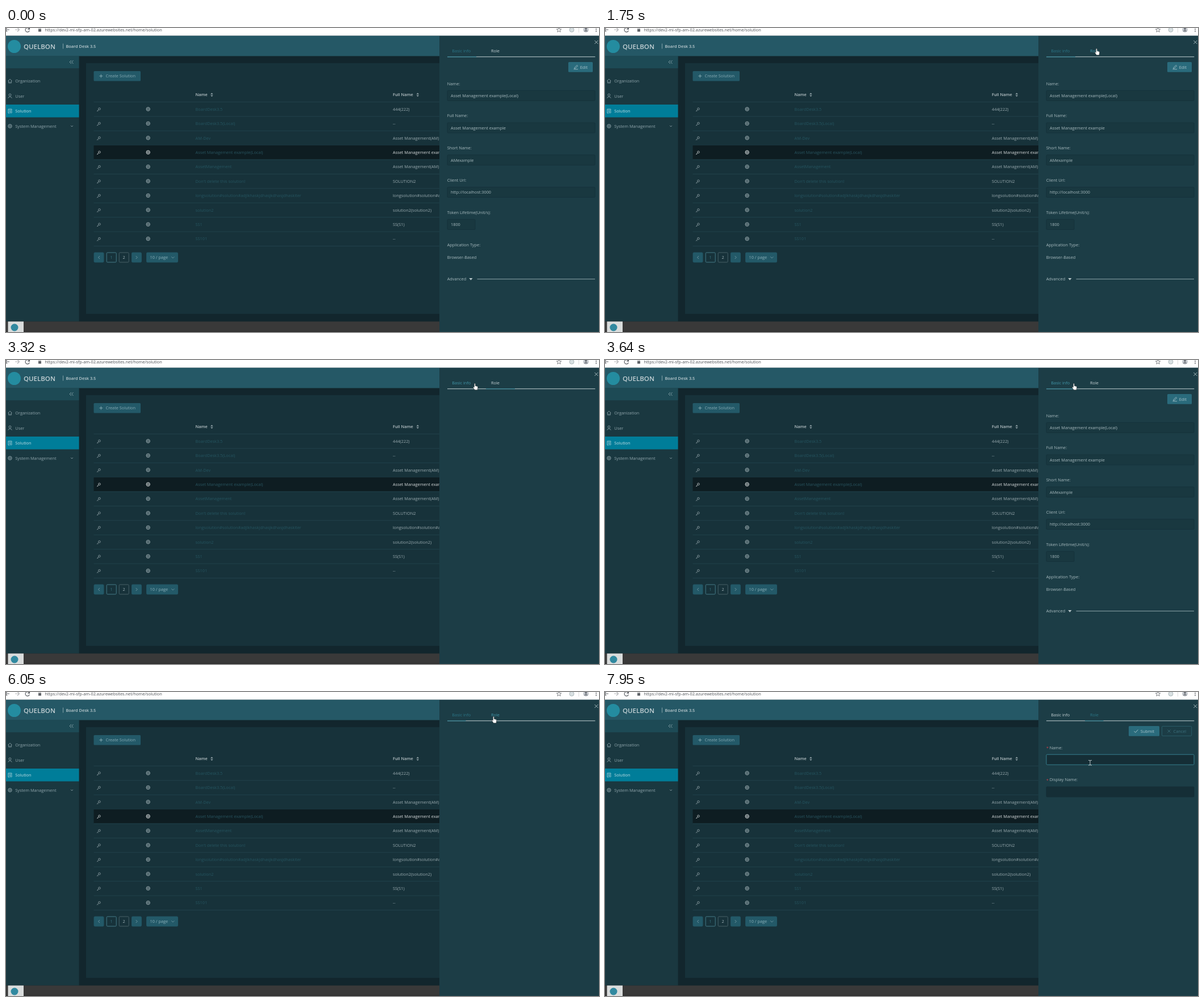
Recreate the animation shown at these times as an HTML page. Size 1044 by 536 pixels, loop 8 s.

```html
<!DOCTYPE html>
<html lang="en">
<head>
<meta charset="utf-8">
<title>Solution settings</title>
<style>
  html, body { margin: 0; width: 100%; height: 100%; overflow: hidden; background: #12272e; }
  svg { display: block; width: 1044px; height: 536px; }
  text { font-family: "Open Sans", "Noto Sans", sans-serif; font-size: 7.35px; white-space: pre; }
</style>
</head>
<body>
<svg id="stage" viewBox="0 0 1044 536" xmlns="http://www.w3.org/2000/svg"></svg>
<script>
const LOOP = 8000;
const TEAL = '#2b7586', HOVER = '#4095a8', LIGHT = '#c3d0d3', LABEL = '#a7babe';
const BUTTON = '#2a6b7c', BUTTON_TEXT = '#a9c4cb', DIM_BUTTON = '#235968';

// Drawing helpers; text is placed by the middle of its line
const rect = (x, y, w, h, fill, more = '') =>
  `<rect x="${x}" y="${y}" width="${w}" height="${h}" fill="${fill}" ${more}/>`;
const text = (x, y, s, fill, more = '') =>
  `<text x="${x}" y="${y + 2.7}" fill="${fill}" ${more}>${s}</text>`;
const line = (d, color, w = 0.8, more = '') =>
  `<path d="${d}" fill="none" stroke="${color}" stroke-width="${w}" ${more}/>`;
const circle = (x, y, r, fill, more = '') =>
  `<circle cx="${x}" cy="${y}" r="${r}" fill="${fill}" ${more}/>`;
const ring = (x, y, r, color, w = 0.8) =>
  circle(x, y, r, 'none', `stroke="${color}" stroke-width="${w}"`);
const group = (id, body, more = '') => `<g id="${id}" ${more}>${body}</g>`;
const BOLD = 'font-weight="600"', MIDDLE = 'text-anchor="middle"';

function plus(x, y, color) {
  return line(`M${x - 3} ${y}h6M${x} ${y - 3}v6`, color, 0.9);
}

function browserBar() {
  const ink = '#5f6368';
  return rect(0, 0, 1044, 13.5, '#fff') +
    line('M-1 3H6M2-.5L-1 3l3 3.5', ink, 1.2) +
    line('M16 3h7M20-.5L23.5 3 20 6.5', '#b5b7ba', 1.2) +
    line('M41 1.5A3.7 3.7 0 1 0 41.3 4.5M41.5-1v3.2h-3.2', ink, 1.2) +
    rect(57, 2, 5, 4.5, ink) + line('M58.2 2V.5a1.3 1.3 0 0 1 2.6 0V2', ink, 0.8) +
    text(68.5, 3.2, 'https://dev2-mi-sfp-am-02.azurewebsites.net/home/solution', '#4c5055') +
    line('M973.5-1l1.1 3 3.1.1-2.4 2 .8 3-2.6-1.7-2.6 1.7.8-3-2.4-2 3.1-.1z', ink, 0.8) +
    circle(996, 3.2, 4, '#d8e0e2', 'stroke="#99a6aa" stroke-width=".7"') +
    line('M1008.5 0v8', '#d5d5d5') +
    circle(1021, 3, 5, '#c9cdd2') + circle(1021, 1.6, 1.8, '#6b7077') +
    `<path d="M1017.7 6a3.4 2.7 0 0 1 6.6 0z" fill="#6b7077"/>` +
    circle(1039, 0, 0.9, ink) + circle(1039, 3, 0.9, ink) + circle(1039, 6, 0.9, ink);
}

function header() {
  return rect(0, 13.5, 1044, 36, '#255866') +
    circle(14.5, 32.5, 11.5, '#248ca0') +
    text(31, 33.8, 'QUELBON', '#c4d1d5', `${BOLD} style="font-size:11.5px"`) +
    line('M100.5 27.5v9', '#8faab1', 0.9) +
    text(105.5, 32, 'Board Desk 3.5', '#bdccd0', BOLD);
}

function sidebar() {
  const ink = '#8fa5ab', x = 7;
  const item = (y, s, color = ink) => text(16.3, y + 0.5, s, color);
  return rect(0, 49.5, 128.5, 468, '#1a3840') + rect(0, 49.5, 128.5, 21.5, '#1d4a55') +
    rect(0, 135, 128.5, 22.5, '#007d99') +
    line('M115 57l-3 3 3 3M118.5 57l-3 3 3 3', '#9bb4ba') +
    line(`M3.5 93.3L${x} 90l3.5 3.3M4.5 92.7v4.2h5v-4.2M${x} 96.9v-2.5`, ink) + item(93, 'Organization') +
    ring(x, 118, 2, ink) + line('M3.7 123.7a3.4 3.4 0 0 1 6.6 0', ink) + item(119.7, 'User') +
    line('M4 143h6v3M4 143v7h2.5M5.5 145h3M5.5 147h1.5', '#b5d5dc') + ring(8.8, 148.2, 1.6, '#b5d5dc') +
    item(146, 'Solution', '#c5dfe5') +
    ring(x, 173, 1.3, ink) + ring(x, 173, 3.2, ink, 1) + item(172.6, 'System Management') +
    line('M114 172l2 2 2-2', ink);
}

const ROWS = [
  ['BoardDesk3.5', '444(222)'], ['BoardDesk3.5(Local)', '--'], ['AM-Dev', 'Asset Management(AM)'],
  ['Asset Management example(Local)', 'Asset Management example'],
  ['AssetManagement', 'Asset Management(AM)'], ["Don't delete this solution!", 'SOLUTION2'],
  ['longsolution#solution#adjlkhaskjdhasjkdhasjdhaskiter', 'longsolution#solution#adjlkhaskjdhasjkdhasjdhaskiter'],
  ['solution2', 'solution2(solution2)'], ['SS1', 'SS(S1)'], ['SS101', '--'],
];

function tableRow([name, fullName], i) {
  const y = 143 + 25.4 * i, picked = i === 3, ink = picked ? '#d5dadb' : '#98a9ae';
  return (picked ? rect(154.5, y - 12.5, 610, 25, '#0e1d22') : '') +
    line(`M154.5 ${y + 12.9}H764`, '#244650', 0.8) +
    ring(164.4, y - 0.4, 1.8, ink) + line(`M163.1 ${y + 0.9}l-3 3M161.2 ${y + 2.8}l1 1`, ink) +
    ring(250.2, y, 3.3, ink) +
    line(`M247 ${y}h6.4M250.2 ${y - 3.3}v6.6M249 ${y - 3}q-1.5 3 0 6M251.4 ${y - 3}q1.5 3 0 6`, ink, 0.6) +
    text(333.5, y, name, picked ? '#28545f' : '#255560') + text(681, y, fullName, ink);
}

function card() {
  const sort = x => `<path d="M${x - 2.3} 117l2.3-2.8 2.3 2.8zM${x - 2.3} 118.5l2.3 2.8 2.3-2.8z" fill="#8c9ea3"/>`;
  const box = (x, w, fill, edge) => rect(x, 396, w, 17, fill, `rx="1.5" stroke="${edge}" stroke-width=".9"`);
  return rect(128.5, 49.5, 640, 468, '#12262d') + rect(141, 62, 630, 442, '#17323a') +
    rect(154.5, 76, 82.5, 17.5, DIM_BUTTON, 'rx="1.5"') + plus(167.3, 84.7, '#8db0b8') +
    text(175.5, 84.7, 'Create Solution', '#86aab3') +
    text(333.5, 117.7, 'Name', '#b6c2c5', BOLD) + sort(362.3) +
    text(681, 117.7, 'Full Name', '#b6c2c5', BOLD) + sort(724.8) +
    line('M154.5 130.4H764', '#244650') + ROWS.map(tableRow).join('') +
    box(155, 17, DIM_BUTTON, DIM_BUTTON) + line('M165 402l-2.5 2.5 2.5 2.5', '#7fa3ac') +
    box(177.2, 17, 'none', '#4a8390') + text(185.6, 404.6, '1', '#397482', MIDDLE) +
    box(199.2, 17, 'none', '#4d656c') + text(207.6, 404.6, '2', '#9db0b5', MIDDLE) +
    box(221.4, 17, DIM_BUTTON, DIM_BUTTON) + line('M228.7 402l2.5 2.5-2.5 2.5', '#7fa3ac') +
    box(247.5, 55, DIM_BUTTON, DIM_BUTTON) + text(253.5, 404.5, '10 / page', '#8bb0b9') +
    line('M291.3 403.3l2.5 2.5 2.5-2.5', '#7fa3ac');
}

function footer() {
  return rect(0, 517.5, 1044, 18.5, '#393939') + rect(0, 534, 1044, 2, '#303030') +
    rect(3.5, 517.5, 27.5, 18.5, '#d9dcdc') + circle(15, 528, 6.5, '#3189a0');
}

const input = (id, y, w = 260) =>
  rect(777, y - 9, w, 18, '#193840', `id="${id}" rx="1.5" stroke="#16323a" stroke-width=".9"`);

function basicPane() {
  const fields = [['Name', 'Asset Management example(Local)'], ['Full Name', 'Asset Management example'],
    ['Short Name', 'AMexample'], ['Client Url', 'http://localhost:3000'], ['Token Lifetime(Unit/s)', '1800']];
  return rect(990, 60, 43, 17.8, BUTTON, 'rx="1.5"') +
    line('M1000.5 71.5l.7-2 4-4 1.4 1.4-4 4zM999.5 72.7h7.5', BUTTON_TEXT) +
    text(1010.7, 69, 'Edit', BUTTON_TEXT) +
    fields.map(([label, value], i) => {
      const y = 119.2 + 56.8 * i;
      return text(776.7, y - 21.4, label + ':', LABEL) + input('field' + i, y, i === 4 ? 49 : 260) +
        text(783, y, value, LABEL);
    }).join('') +
    text(776.7, 382, 'Application Type:', LABEL) + text(776.7, 403.8, 'Browser-Based', LABEL) +
    text(776.7, 442.7, 'Advanced', LABEL) +
    '<path d="M815.3 441h6.2l-3.1 3.8z" fill="#b9c8cb"/>' + line('M829.5 442.7H1037', '#9eb2b6', 0.9);
}

function listPane() {
  return rect(989, 60, 44, 17.8, BUTTON, 'rx="1.5"') + plus(1001.7, 69, BUTTON_TEXT) +
    text(1009.5, 69, 'Add', BUTTON_TEXT) + rect(777, 87, 260, 91.5, '#16313a') +
    '<ellipse cx="907" cy="130" rx="17.3" ry="5.8" fill="#c9d1d3"/>' +
    '<path d="M895 121.5l4.2-7.7h15.6l4.2 7.7v9.5h-24z" fill="#16313a" stroke="#c9d1d3" stroke-width=".8"/>' +
    '<path d="M895 121.5h7.5q1 3.3 3 3.3h3q2 0 3-3.3h7.5v9.5q0 1-1 1h-22q-1 0-1-1z" fill="#e3e7e8"/>' +
    text(907, 145.8, 'No Data', '#aebfc3', MIDDLE);
}

function formPane() {
  const field = (id, y, label) => text(777, y - 20.7, '*', '#c9404c') +
    text(782.7, y - 21.4, label + ':', LABEL) +
    rect(777, y - 9, 260, 18, '#152e36', `id="${id}" rx="1.5" stroke="#152e36" stroke-width=".9"`);
  return rect(922, 60, 54, 17.8, BUTTON, 'rx="1.5"') + line('M931.5 69l2.3 2.5 4.5-5', BUTTON_TEXT, 0.9) +
    text(942.7, 69, 'Submit', BUTTON_TEXT) +
    rect(980.5, 60.4, 52.2, 17, 'none', 'rx="1.5" stroke="#2c606d" stroke-width=".9"') +
    line('M990.5 66.5l5 5m0-5l-5 5', '#3c707d') + text(1000.5, 69, 'Cancel', '#3c707d') +
    field('roleName', 119.2, 'Name') + field('displayName', 176, 'Display Name');
}

function drawer() {
  return rect(763, 13.5, 281, 522.5, '#1c3d46') + line('M1036.3 22l6 6m0-6l-6 6', '#b2c3c7', 0.9) +
    text(785.3, 40, 'Basic info', TEAL, 'id="basicTab"') + text(854, 40, 'Role', LIGHT, 'id="roleTab"') +
    line('M777 50.8H1037.3', LIGHT, 1) + rect(777, 50.2, 51, 1.3, TEAL, 'id="inkBar"') +
    '<clipPath id="paneClip"><rect x="776" y="55" width="262" height="440"/></clipPath>' +
    `<g clip-path="url(#paneClip)">${group('basic', basicPane())}` +
    `${group('list', listPane())}${group('form', formPane())}</g>`;
}

const CURSORS = {
  arrow: '<path d="M0 0v10l2.3-2.2 1.6 3.7 1.5-.7-1.6-3.5h3.3z" fill="#fff" stroke="#222" stroke-width=".6"/>',
  hand: '<path d="M2.4.8q1.2-1 1.9.3v3.5l3.5.8q1 .4.9 1.6l-.7 4.8H3.3L.5 7.6q-.3-1.2 1-1l.9.7z" fill="#fff" stroke="#222" stroke-width=".5"/>',
  blocked: circle(4, 4, 4, '#fff') + ring(4, 4, 3.1, '#d8232e', 1.2) + line('M1.9 1.9l4.2 4.2', '#d8232e', 1.2),
  beam: line('M0 .5h2l1 .7 1-.7h2M3 1v7.5M0 9h2l1-.7L4 9h2', '#dfe6e8', 0.8),
};

const stage = document.getElementById('stage');
stage.innerHTML = card() + sidebar() + header() + footer() + drawer() + browserBar() +
  group('cursor', Object.entries(CURSORS).map(([kind, shape]) => group(kind, shape)).join(''));
const $ = id => document.getElementById(id);

// Pointer stops: time, left, top, shape
const POINTER = [
  [70, 797, 490, 'arrow'], [200, 667, 399, 'arrow'], [910, 667, 399, 'arrow'], [1060, 966, 143, 'arrow'],
  [1290, 966, 143, 'arrow'], [1600, 886, 62, 'arrow'], [1700, 862, 36, 'hand'], [1830, 862, 36, 'hand'],
  [1900, 857, 35, 'hand'], [2070, 857, 35, 'hand'], [2120, 857, 40, 'hand'], [2920, 857, 40, 'hand'],
  [3180, 822, 41, 'hand'], [3790, 822, 41, 'hand'], [3870, 834, 72, 'arrow'], [4090, 862, 142, 'arrow'],
  [4380, 862, 142, 'arrow'], [4580, 836, 122, 'blocked'], [4900, 804, 112, 'blocked'],
  [5110, 804, 112, 'blocked'], [5180, 818, 88, 'arrow'], [5420, 850, 52, 'arrow'], [5500, 856, 40, 'hand'],
  [5800, 855, 43, 'hand'], [6140, 855, 43, 'hand'], [6300, 878, 100, 'arrow'], [6480, 915, 149, 'arrow'],
  [6780, 1000, 78, 'arrow'], [6860, 1009, 64, 'hand'], [6930, 1010, 58, 'hand'], [7300, 1010, 62, 'hand'],
  [7560, 1010, 62, 'hand'], [7640, 975, 80, 'arrow'], [7760, 892, 112, 'beam'], [7900, 851, 120, 'beam'],
];

// Pane changes: start time, length, end position (0 basic, 1 role)
const SLIDES = [[2464, 300, 1], [3310, 290, 0], [6140, 290, 1]];

const within = (t, from, to) => t >= from && t < to;
const clamp = p => Math.min(1, Math.max(0, p));
const ease = p => p < 0.5 ? 4 * p ** 3 : 1 - 4 * (1 - p) ** 3;

function slideAt(t) {
  return SLIDES.reduce((from, [start, length, to]) =>
    from + (to - from) * ease(clamp((t - start) / length)), 0);
}

function mix(a, b, p) {
  const part = (c, i) => parseInt(c.slice(i, i + 2), 16);
  return `rgb(${[1, 3, 5].map(i => Math.round(part(a, i) + (part(b, i) - part(a, i)) * p))})`;
}

function drawPointer(t) {
  const i = POINTER.findLastIndex(stop => stop[0] <= t);
  $('cursor').style.display = i < 0 ? 'none' : '';
  if (i < 0) return;
  const [start, x, y, kind] = POINTER[i];
  const [end, nextX, nextY] = POINTER[i + 1] || [LOOP, x, y];
  const p = (t - start) / (end - start);
  $('cursor').setAttribute('transform', `translate(${x + (nextX - x) * p} ${y + (nextY - y) * p})`);
  for (const name in CURSORS) $(name).style.display = name === kind ? '' : 'none';
}

function drawPanes(t) {
  const slide = slideAt(t), role = within(t, 2440, 3300) || t >= 6040, form = t >= 7080;
  const hovered = within(t, 1690, 3000) || within(t, 5480, 6200);
  $('basic').setAttribute('transform', `translate(${-260 * slide} 0)`);
  $('basic').style.opacity = role ? 0 : 1 - slide;
  $('list').setAttribute('transform', `translate(${260 * (1 - slide)} 0)`);
  $('list').style.opacity = role && !form ? slide : 0;
  $('form').style.display = form ? '' : 'none';
  $('inkBar').setAttribute('x', 777 + 68 * slide);
  $('inkBar').setAttribute('width', role ? 32.5 : 51);
  $('basicTab').setAttribute('fill', within(t, 3130, 3840) ? HOVER : mix(TEAL, LIGHT, slide));
  $('roleTab').setAttribute('fill', hovered ? HOVER : role ? TEAL : LIGHT);
  $('field0').setAttribute('stroke', within(t, 4580, 5140) ? '#c6d2d4' : '#16323a');
  $('roleName').setAttribute('stroke', t >= 7740 ? '#3a8797' : '#152e36');
}

function frame(now) {
  const t = now % LOOP;
  drawPanes(t);
  drawPointer(t);
  requestAnimationFrame(frame);
}
requestAnimationFrame(frame);
</script>
</body>
</html>
```
